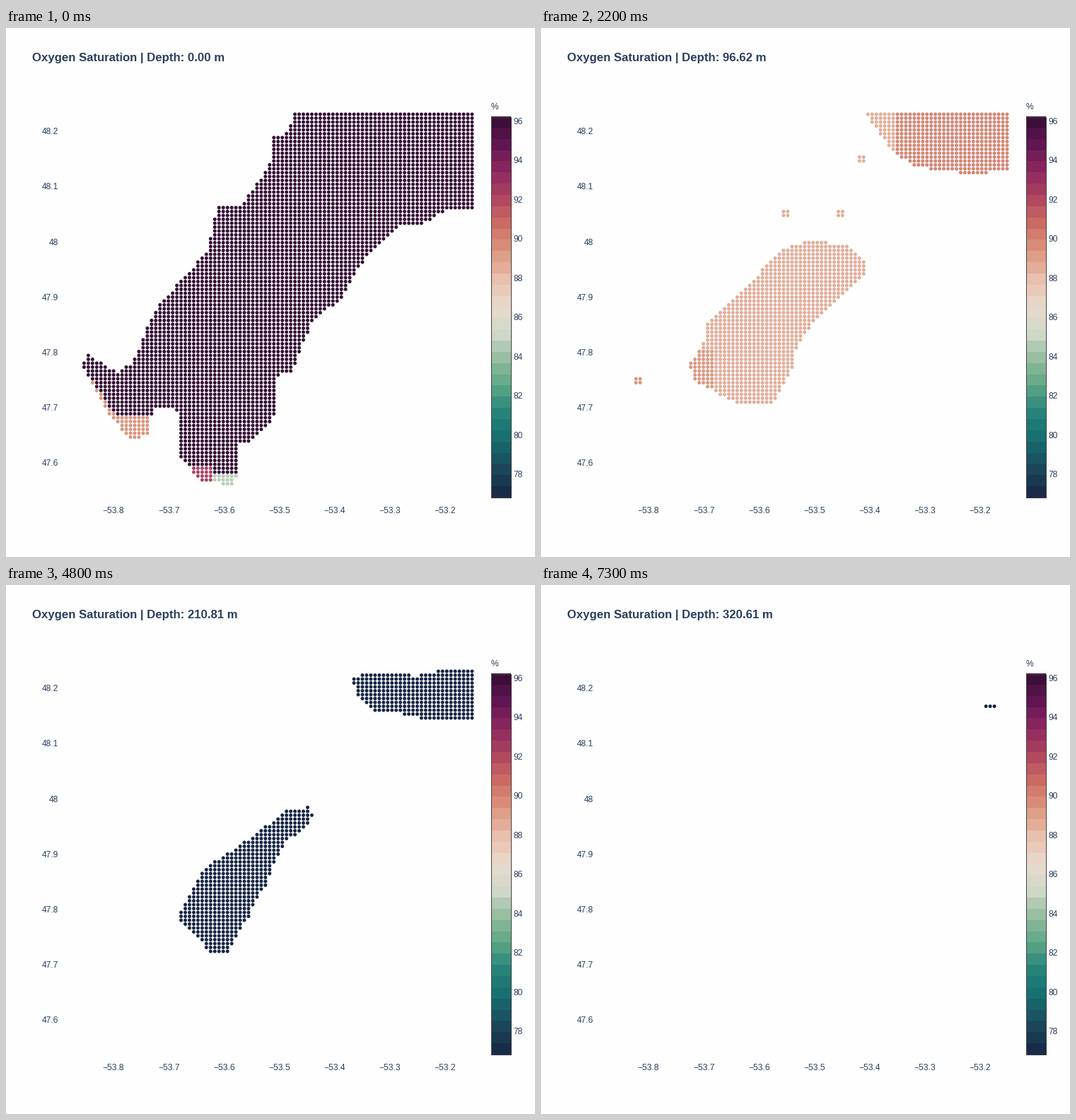
Write a matplotlib script that moves like this. It is 748 by 748 pixels and loops after 7.4 s.

```python
import numpy as np
import matplotlib.pyplot as plt
from matplotlib.animation import FuncAnimation
from matplotlib.colors import LinearSegmentedColormap
from matplotlib.patches import Rectangle

SIZE, DPI = 748, 100
FRAMES, INTERVAL = 74, 100
DEPTH_STEP = 4.39192
INK = "#2a3f5f"
BAR_TOP, BAR_BOTTOM, BANDS = 125, 664, 34
plt.rcParams["font.family"] = "Liberation Sans"


def px(n):
    return n * 72 / DPI


# ---- colour scale, dark purple at the top to navy at the bottom ----
CURL = LinearSegmentedColormap.from_list("curl", [
    "#340d35", "#621552", "#8d275f", "#b0465f", "#cd6e64", "#dc9780",
    "#e9c0ae", "#e9dacd", "#cfd8c9", "#8dba98", "#57a385", "#228078",
    "#166a6d", "#1b4559", "#172646"])


def bar_y(value):
    return 131.5 + (96 - value) * 27.75


def colours(values):
    return CURL((bar_y(values) - BAR_TOP) / (BAR_BOTTOM - BAR_TOP))


# ---- water outlines at a few key frames ----
def box(x0, y0, x1, y1):
    return [(x0, y0), (x1, y0), (x1, y1), (x0, y1)]


coast = [(408, 122), (659, 122), (659, 256), (623, 253), (587, 276),
         (551, 279), (503, 328), (468, 386), (432, 410), (402, 484),
         (380, 490), (379, 547), (343, 584), (325, 584), (322, 644),
         (280, 639), (250, 609), (247, 540), (236, 535), (205, 535),
         (200, 573), (177, 579), (152, 551), (110, 479), (118, 465),
         (158, 491), (182, 474), (212, 402), (248, 359), (287, 318),
         (300, 256), (335, 254), (379, 188), (379, 157), (402, 150)]

OUTLINES = {
    0: [coast],
    8: [[(450, 122), (659, 122), (659, 213), (528, 213), (500, 189),
         (473, 188), (468, 155)],
        [(373, 291), (432, 289), (474, 334), (462, 360), (402, 408),
         (378, 462), (355, 482), (343, 523), (331, 535), (265, 535),
         (248, 523), (190, 517), (188, 496), (212, 457), (226, 409),
         (268, 378), (267, 338), (325, 309)],
        [(292, 535), (292, 584)], box(271, 564, 313, 579)],
    14: [[(456, 122), (659, 122), (659, 204), (552, 204), (510, 193),
          (474, 150)],
         [(373, 298), (402, 298), (444, 309), (462, 326), (462, 347),
          (432, 375), (402, 397), (367, 452), (355, 457), (355, 485),
          (331, 529), (283, 535), (206, 501), (212, 468), (236, 408),
          (280, 380), (283, 348), (343, 309)]],
    22: [[(462, 122), (659, 122), (659, 200), (605, 204), (527, 193),
          (498, 171)],
         [(379, 303), (432, 309), (456, 331), (456, 348), (384, 413),
          (355, 457), (355, 479), (325, 529), (277, 529), (218, 496),
          (212, 476), (236, 441), (236, 419), (295, 365), (343, 314)]],
    40: [[(474, 122), (659, 122), (659, 193), (593, 193), (550, 187),
          (525, 188), (492, 155)],
         [(390, 314), (432, 314), (438, 342), (402, 370), (373, 424),
          (349, 474), (331, 490), (319, 523), (289, 523), (230, 474),
          (271, 397), (337, 353)]],
    56: [[(504, 138), (516, 131), (558, 133), (580, 143), (605, 128),
          (630, 122), (659, 122), (659, 188), (605, 188), (575, 171),
          (528, 171), (504, 155)],
         [(379, 361), (361, 402), (361, 419), (343, 424), (325, 485),
          (307, 512), (295, 512), (266, 474), (266, 457), (301, 408)],
         [(390, 347), (405, 326), (426, 320), (426, 325)]],
    64: [[(593, 150), (659, 133), (659, 177), (605, 177)],
         [(335, 397), (325, 424), (313, 474), (301, 474), (289, 457)]],
    72: [box(617, 160, 659, 171)],
    73: [[(629, 171.5), (641, 171.5)]],
}

# small basins: centre, half size, last frame; they shrink with depth
BASINS = [(453, 185, 7, 9, 30), (348, 262.5, 13, 9, 30),
          (424, 262.5, 10, 9, 30), (136, 497, 12, 11, 30),
          (349, 237, 7, 7, 12), (504, 315, 7, 6, 12)]

# ---- measuring grid ----
cols = 659 - 5.963 * np.arange(93)
rows = 122 + 5.5 * np.arange(97)
X, Y = (a.ravel() for a in np.meshgrid(cols, rows))


def signed_distance(poly):
    """Distance to a polygon's edge, positive inside."""
    dist = np.full(X.shape, 1e9)
    inside = np.zeros(X.shape, bool)
    for (x0, y0), (x1, y1) in zip(poly, poly[1:] + poly[:1]):
        dx, dy = x1 - x0, y1 - y0
        t = ((X - x0) * dx + (Y - y0) * dy) / (dx * dx + dy * dy)
        t = np.clip(t, 0, 1)
        dist = np.minimum(dist, np.hypot(X - x0 - t * dx, Y - y0 - t * dy))
        if dy:
            crosses = (Y < y0) != (Y < y1)
            inside ^= crosses & (X < x0 + (Y - y0) * dx / dy)
    return np.where(inside, dist, -dist)


KEYS = list(OUTLINES)
LEVELS = [np.clip(np.max([signed_distance(p) for p in OUTLINES[k]], axis=0),
                  -14, 14) for k in KEYS]
MARGIN = -2.6


def water(n):
    i = min(np.searchsorted(KEYS, n, side="right") - 1, len(KEYS) - 2)
    t = (n - KEYS[i]) / (KEYS[i + 1] - KEYS[i])
    wet = (1 - t) * LEVELS[i] + t * LEVELS[i + 1] > MARGIN
    shrink = min(1, 0.95 ** (n - 8))
    for cx, cy, w, h, last in BASINS:
        if n <= last:
            wet |= (abs(X - cx) < w * shrink) & (abs(Y - cy) < h * shrink)
    return wet & (LEVELS[0] > MARGIN)


# ---- saturation by depth layer ----
north_arm = (Y < 215) & (X > 460)
east_arm = north_arm & (X > 501)
islets = (Y < 280) & (X < 460)

surface = np.full(X.shape, 96.2)
surface[(X < 204) & ((Y > 549) | (Y > 500 + 1.45 * (X - 122)))] = 89.4
surface[(X > 262) & (X < 292) & (Y > 620)] = 92.2
surface[(X > 292) & (X < 329) & (Y > 631)] = 84.7

upper = np.where(X > 333, np.where(Y > 459, 93.2, 92.2), 93.4)
upper[(X > 262) & (X < 333) & (Y > 384) & (Y < 448)] = 94.3
upper[(X > 333) & (Y > 428) & (Y < 459)] = 91.3
upper[(X > 333) & (Y < 345)] = 92.6
upper[north_arm & (X < 489) | islets] = 91.5
upper[north_arm & (X > 489)] = 93.1
upper[east_arm] = 94.4

middle = np.full(X.shape, 88.5)
middle[(X < 245) & (Y > 456)] = 89.3
middle[east_arm] = 89.9

LAYERS = [(3, surface), (11, 96.2), (12, 95.5), (14, 94.6), (17, upper),
          (20, (upper + middle) / 2), (24, middle), (28, 87.3), (47, 85.6),
          (FRAMES, 76.8)]


def saturation(n):
    layer = next(v for end, v in LAYERS if n < end)
    return np.broadcast_to(layer, X.shape)


# ---- stage ----
fig = plt.figure(figsize=(SIZE / DPI, SIZE / DPI), dpi=DPI,
                 facecolor="#fefefe")
ax = fig.add_axes([0, 0, 1, 1])
ax.set_xlim(0, SIZE)
ax.set_ylim(SIZE, 0)
ax.axis("off")


def label(x, y, text, size=12, ha="left", **kw):
    return ax.text(x, y + size * 0.36, text, fontsize=px(size), color=INK,
                   ha=ha, va="baseline", **kw)


title = label(37, 41, "", 16.8, weight="bold")
for i in range(7):
    label(74.5, 146 + 78.17 * i, f"{48.2 - 0.1 * i:.3g}", ha="right")
    label(152 + 78.17 * i, 681.5, f"\u2212{53.8 - 0.1 * i:.1f}", ha="center")
label(685.5, 110.5, "%")
for v in range(78, 97, 2):
    label(717.5, bar_y(v), str(v))

band = (BAR_BOTTOM - BAR_TOP) / BANDS
for i in range(BANDS):
    ax.add_patch(Rectangle((686, BAR_TOP + i * band), 28.5, band, linewidth=0,
                           facecolor=CURL((i + 0.5) / BANDS),
                           antialiased=False))
ax.add_patch(Rectangle((686.5, 125.5), 28, 538, fill=False,
                       edgecolor="#444444", linewidth=px(1)))

dots = ax.scatter([], [], s=px(5) ** 2, linewidths=0)


def draw(n):
    wet = water(n)
    dots.set_offsets(np.column_stack([X[wet], Y[wet]]))
    dots.set_facecolor(colours(saturation(n)[wet]))
    title.set_text(f"Oxygen Saturation | Depth: {n * DEPTH_STEP:.2f} m")
    return dots, title


anim = FuncAnimation(fig, draw, frames=FRAMES, interval=INTERVAL, repeat=True,
                     repeat_delay=0, init_func=lambda: draw(0), blit=False)
plt.show()
```
